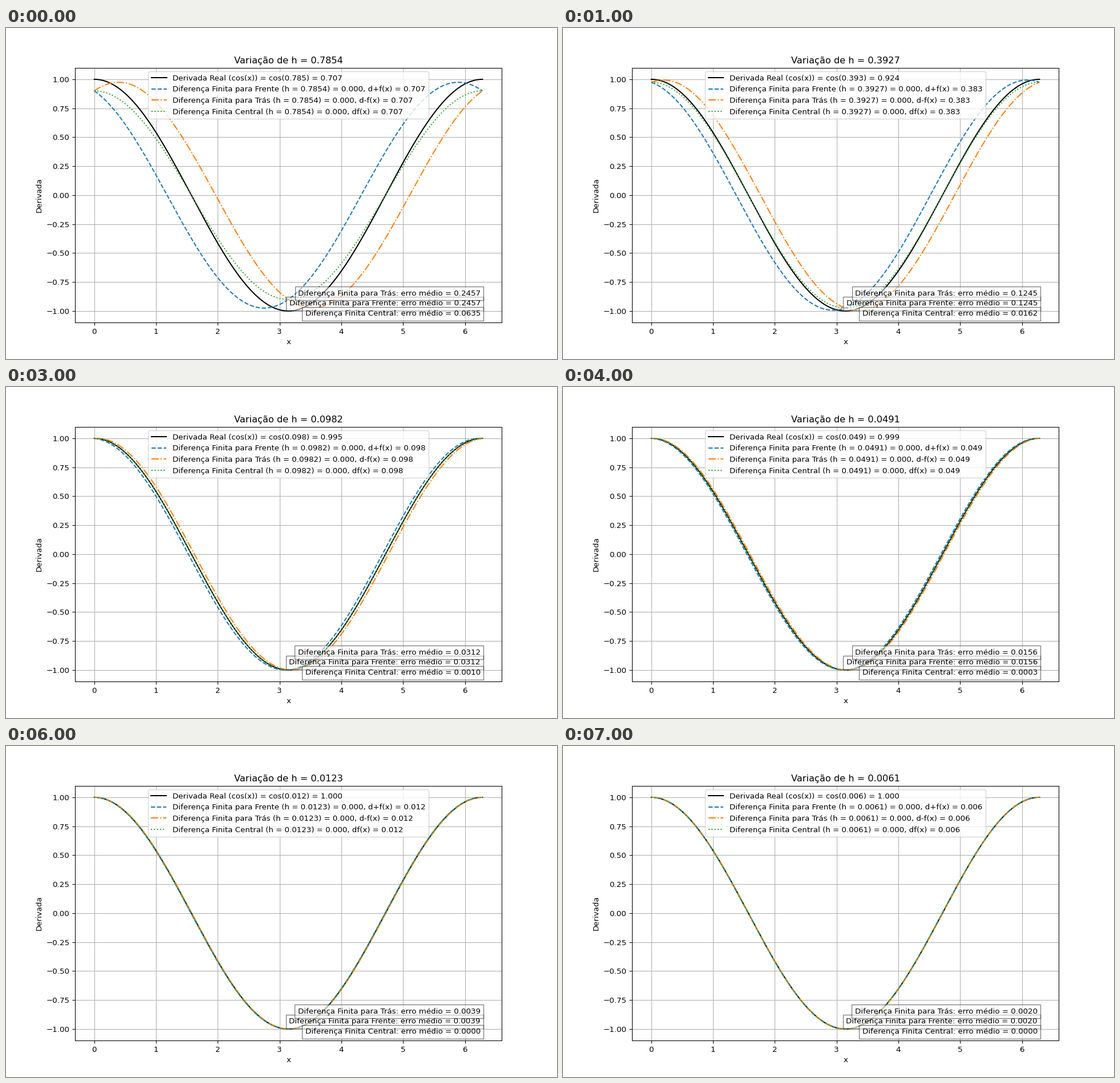
Write a matplotlib script that moves like this. It is 966 by 580 pixels and loops after 8 s.

```python
import numpy as np
import matplotlib.pyplot as plt
from matplotlib.animation import FuncAnimation

STEPS = 8
WIDTH, HEIGHT, DPI = 966, 580, 96.6
x = np.linspace(0, 2 * np.pi, 10000)
exact = np.cos(x)

fig, ax = plt.subplots(figsize=(WIDTH / DPI, HEIGHT / DPI), dpi=DPI)


def differences(h):
    """Forward, backward and central differences of sin(x)."""
    ahead, here, behind = np.sin(x + h), np.sin(x), np.sin(x - h)
    return (ahead - here) / h, (here - behind) / h, (ahead - behind) / (2 * h)


def error_box(y, name, approx):
    error = np.mean(np.abs(exact - approx))
    ax.text(0.95, y, f"Diferença Finita {name}: erro médio = {error:.4f}",
            transform=ax.transAxes, ha="right", va="bottom",
            bbox=dict(facecolor="white", alpha=0.5))


def draw(step):
    ax.clear()
    h = np.pi / 4 / 2 ** step
    forward, backward, central = differences(h)
    schemes = [
        ("para Frente", "d+f", forward, "--", "tab:blue", 0.06),
        ("para Trás", "d-f", backward, "-.", "tab:orange", 0.10),
        ("Central", "df", central, ":", "tab:green", 0.02),
    ]

    ax.plot(x, exact, color="black",
            label=f"Derivada Real (cos(x)) = cos({h:.3f}) = {np.cos(h):.3f}")
    for name, symbol, approx, style, color, y in schemes:
        ax.plot(x, approx, style, color=color,
                label=f"Diferença Finita {name} (h = {h:.4f}) = 0.000, "
                      f"{symbol}(x) = {np.sin(h):.3f}")
        error_box(y, name, approx)

    ax.set_title(f"Variação de h = {h:.4f}")
    ax.set_xlabel("x")
    ax.set_ylabel("Derivada")
    ax.grid(True)
    ax.legend(loc="upper center")


anim = FuncAnimation(fig, draw, frames=STEPS, interval=1000,
                     init_func=lambda: draw(0), repeat=True)
plt.show()
```
